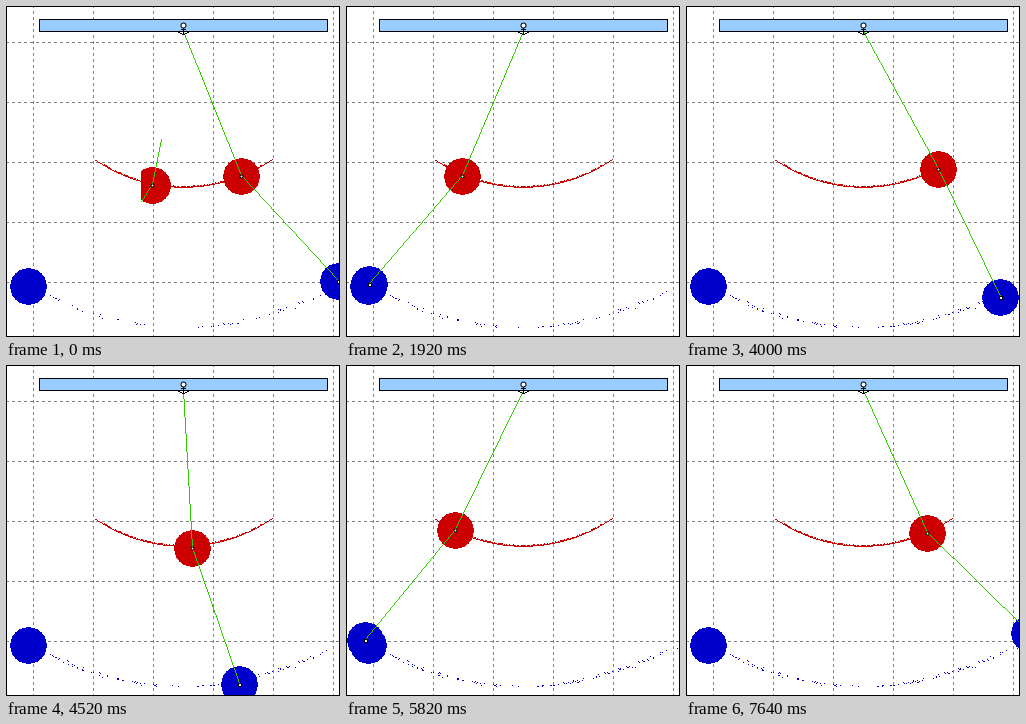
Animation, 334 px wide and 331 px high, one loop 8 s. Source, as a matplotlib script:

```python
import numpy as np
import matplotlib.pyplot as plt
from matplotlib.animation import FuncAnimation
from matplotlib.patches import Circle, Polygon, Rectangle

W, H, DPI = 334, 331, 100
PX = 72 / DPI  # one pixel in points
RED, BLUE, GREEN, GREY = "#cc0000", "#0000cc", "#33cc00", "#808080"
PIVOT = np.array([177, 26])
LEN1, LEN2 = 155.8, 142.5
RADIUS = 17.7
STEP, FIRST_HOLD, LAST_STATE = 260, 100, 30
INTERVAL, LOOP = 20, 8000

# state, upper bob x/y, lower bob x/y
POSES = np.array([
    (0, 235, 170, 332, 275),
    (5, 108, 166, 51, 296),
    (8, 116, 170, 23, 278),
    (10, 163, 181, 126, 318),
    (12, 194, 181, 259, 307),
    (16, 252, 163, 314, 291),
    (20, 143, 178, 100, 314),
    (25, 116, 169, 85, 308),
    (26, 145, 178, 129, 320),
    (30, 241, 168, 343, 268),
])


def swing_basis(s):
    """Slow and fast normal modes of the double pendulum."""
    slow, fast = np.radians(22.75) * s, np.radians(56.6) * s
    return np.stack([np.cos(slow), np.sin(slow), np.cos(fast), np.sin(fast)], axis=1)


def swing(key_states, offsets, length, states):
    """Arm vectors from the modal swing, nudged to pass through the key offsets."""
    angles = np.arctan2(offsets[:, 0], offsets[:, 1])
    coef = np.linalg.lstsq(swing_basis(key_states), angles, rcond=None)[0]

    def model(s):
        angle = swing_basis(s) @ coef
        return length * np.stack([np.sin(angle), np.cos(angle)], axis=1)

    miss = offsets - model(key_states)
    nudge = [np.interp(states, key_states, column) for column in miss.T]
    return model(states) + np.stack(nudge, axis=1)


key_states, upper, lower = POSES[:, 0], POSES[:, 1:3], POSES[:, 3:5]
states = np.arange(LAST_STATE + 1)
arm1 = swing(key_states, upper - PIVOT, LEN1, states)
arm2 = swing(key_states, lower - upper, LEN2, states)
bob1 = np.round(PIVOT + arm1)
bob2 = np.round(PIVOT + arm1 + arm2)

fig = plt.figure(figsize=(W / DPI, H / DPI), dpi=DPI, facecolor="white")
ax = fig.add_axes([0, 0, 1, 1])
ax.set(xlim=(0, W), ylim=(H, 0))
ax.axis("off")


def pixels(x, y, color, z):
    return ax.plot(x, y, ",", color=color, zorder=z, antialiased=False)[0]


def trace_path(points):
    """Pixels of a one-pixel polyline."""
    points = np.asarray(points, float)
    parts = []
    for start, end in zip(points, points[1:]):
        count = int(np.abs(end - start).max()) + 1
        parts.append(np.round(np.linspace(start, end, count)))
    return np.concatenate(parts).T


def ball(center, color, z):
    return ax.add_patch(Circle(center + 0.5, RADIUS, fc=color, ec="none",
                               zorder=z, antialiased=False))


def box(x, y, w, h, z, fill="none"):
    ax.add_patch(Rectangle((x, y), w, h, fc=fill, ec="black", lw=PX,
                           zorder=z, antialiased=False))


def pin(center, z, shape="o", size=3, fill="white"):
    return ax.plot([center[0]], [center[1]], shape, ms=size * PX, mfc=fill,
                   mec="black", mew=PX, zorder=z)[0]


# Background grid, three pixels on and three off
along = np.arange(W)
along = along[along % 6 < 3]
for gx in range(27, W, 60):
    pixels(np.full(along.size, gx), along, GREY, 1)
for gy in range(37, H, 60):
    pixels(along, np.full(along.size, gy), GREY, 1)

# Ceiling bar, anchor and frame
box(33, 13, 288, 12, 2, "#99ccff")
for shape in ([(177, 22), (177, 29)],
              [(175, 24), (179, 24)],
              [(171, 26), (174, 28), (177, 29), (180, 28), (183, 26)]):
    pixels(*trace_path(shape), "black", 8)
pin((177, 19), 9, size=5)
box(0, 0, W - 1, H - 1, 10)

# Traces
rng = np.random.default_rng(7)
dx = np.arange(-88, 90)
arc_y = np.round(PIVOT[1] + np.sqrt(LEN1**2 - dx**2))
pixels(PIVOT[0] + dx, arc_y, RED, 3)
thick = (np.abs(dx) < 80) & (rng.random(dx.size) < 0.6)
pixels(PIVOT[0] + dx[thick], arc_y[thick] - 1, RED, 3)

dot_x = rng.uniform(38, 332, 125)
offset = dot_x - PIVOT[0]
dot_y = 322.3 - 0.0018 * offset**2 + rng.normal(0, 1, 125) * (0.4 + np.abs(offset) / 110)
dots = pixels([], [], BLUE, 3)
ball(np.array([22, 280]), BLUE, 3)

# Cut-off bob left on the stage before the first move
turn = np.linspace(0, 2 * np.pi, 90)
cut_disc = np.column_stack([np.maximum(146.5 + RADIUS * np.cos(turn), 135),
                            179.5 + RADIUS * np.sin(turn)])
leftover = [
    ax.add_patch(Polygon(cut_disc, fc=RED, ec="none", zorder=4, antialiased=False)),
    pixels(*trace_path([(155, 134), (146, 179), (135, 196)]), GREEN, 5),
    pin((146, 179), 6),
]

# Moving pendulum
disc1, disc2 = ball(bob1[0], RED, 5), ball(bob2[0], BLUE, 5)
links = pixels([], [], GREEN, 6)
pin1 = pin(bob1[0], 7)
pin2 = pin(bob2[0], 7, "s", 3, "#ffffcc")


def update(frame):
    t = frame * INTERVAL
    state = 0 if t < FIRST_HOLD else min((t - FIRST_HOLD) // STEP + 1, LAST_STATE)
    a, b = bob1[state], bob2[state]
    disc1.center, disc2.center = a + 0.5, b + 0.5
    links.set_data(*trace_path([PIVOT, a, b]))
    pin1.set_data([a[0]], [a[1]])
    pin2.set_data([b[0]], [b[1]])
    count = 55 + 3 * min(state, 23)
    dots.set_data(dot_x[:count], dot_y[:count])
    for item in leftover:
        item.set_visible(state == 0)
    return [disc1, disc2, links, pin1, pin2, dots, *leftover]


anim = FuncAnimation(fig, update, frames=LOOP // INTERVAL, interval=INTERVAL,
                     repeat=True, repeat_delay=0, cache_frame_data=False)
plt.show()
```
